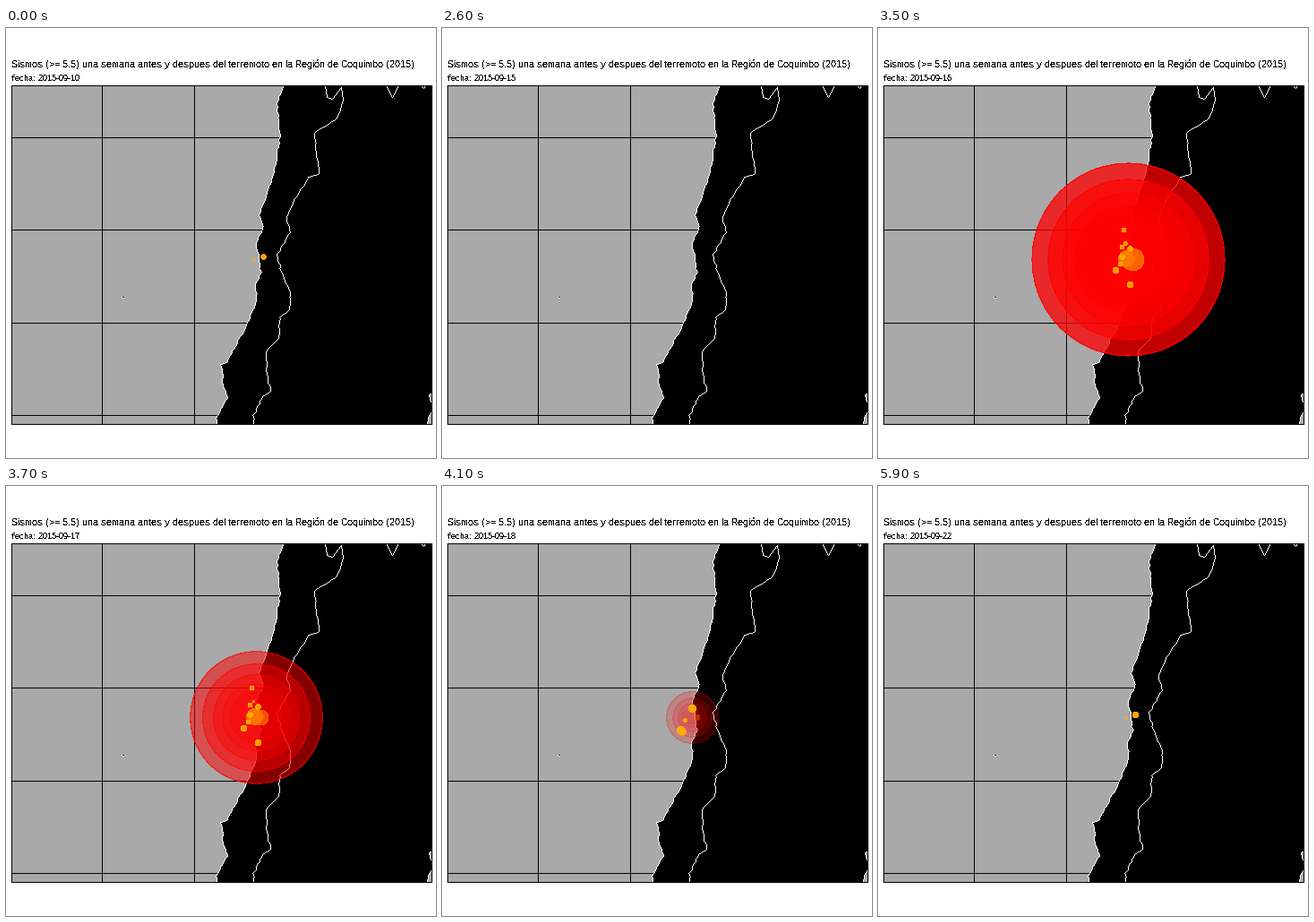
Animation of 480x480 px, one loop 6 s. Source, as a matplotlib script:

```python
import matplotlib.pyplot as plt
import numpy as np
from matplotlib.animation import FuncAnimation
from matplotlib.collections import PolyCollection
from matplotlib.patches import Circle, Polygon, Rectangle

SIZE, DPI = 480, 72
FRAMES, INTERVAL = 60, 100
WAKE = 18
SEA = "#a9a9a9"
LEFT, TOP, RIGHT, BOTTOM = 6, 64, 475, 442
GRID_STEP = 103.3

plt.rcParams.update({
    "font.family": "Liberation Sans",
    "text.hinting": "native",
    "text.hinting_factor": 1,
})
rng = np.random.default_rng(4)

# main bends from north to south
COAST = [
    (309, 64), (302, 84), (305, 120), (299, 160), (291, 184), (282, 208),
    (287, 221), (279, 240), (284, 272), (278, 287), (279, 303), (270, 328),
    (246, 373), (239, 375), (242, 386), (241, 395), (247, 413), (235, 434),
    (235, 442),
]
BORDER = [
    (376, 80), (369, 101), (344, 116), (347, 148), (349, 163), (338, 166),
    (322, 190), (313, 210), (316, 228), (302, 254), (310, 282), (317, 294),
    (316, 314), (305, 323), (304, 345), (290, 361), (290, 385), (296, 405),
    (286, 410), (276, 432), (276, 442),
]
NORTH = [
    [(356, 64), (358, 77), (364, 79), (374, 66), (376, 80)],
    [(424, 64), (431, 77), (438, 64)],
    [(463, 64), (466, 67), (468, 64)],
]
BAYS = [
    [(475, 407), (472, 409), (473, 415), (475, 418)],
    [(475, 428), (471, 434), (470, 442)],
]

# (first frame, last frame, leaves a wake, dots as x, y, radius)
QUAKES = [
    (30, 34, True, [(279, 258, 128), (284, 258, 15), (271, 262, 3.5),
                    (277, 250, 3), (276, 240, 2.8)]),
    (35, 39, False, [(277, 257, 9), (281, 286, 3.7), (265, 270, 3.7),
                     (272, 255, 3), (281, 246, 3), (274, 225, 2.8),
                     (272, 244, 2.8), (270, 263, 2.8)]),
    (40, 44, True, [(266, 272, 4.5), (268, 274, 4), (279, 248, 4.5),
                    (271, 261, 2.2)]),
    (55, 58, True, [(287, 255, 4.5), (277, 258, 1.6)]),
]

fig = plt.figure(figsize=(SIZE / DPI, SIZE / DPI), dpi=DPI, facecolor="white")
ax = fig.add_axes([0, 0, 1, 1])
ax.set_xlim(0, SIZE)
ax.set_ylim(SIZE, 0)
ax.axis("off")


def ink(points, color, z):
    """Draw a crisp one-pixel polyline."""
    cells = set()
    for (x0, y0), (x1, y1) in zip(points, points[1:]):
        n = int(max(abs(x1 - x0), abs(y1 - y0), 1)) + 1
        xs = np.floor(np.linspace(x0, x1, n) + 0.5)
        ys = np.floor(np.linspace(y0, y1, n) + 0.5)
        cells.update(zip(xs, ys))
    squares = [[(x, y), (x + 1, y), (x + 1, y + 1), (x, y + 1)]
               for x, y in cells]
    ax.add_collection(PolyCollection(squares, facecolors=color,
                                     edgecolors="none", linewidths=0,
                                     zorder=z), autolim=False)


def area(points, color, z):
    ax.add_patch(Polygon([(x + 0.5, y + 0.5) for x, y in points],
                         fc=color, lw=0, zorder=z))


def rugged(bends):
    """One point per row between the bends, with a small random wiggle."""
    xs, ys = zip(*bends)
    rows = np.arange(ys[0], ys[-1] + 1)
    knots = rows[::4]
    wiggle = np.interp(rows, knots, rng.uniform(-1, 1, len(knots)))
    return list(zip(np.round(np.interp(rows, ys, xs) + wiggle), rows))


def label(x, y, text, size):
    return ax.text(x, y, text, fontsize=size, va="baseline", ha="left",
                   color="black", antialiased=False)


def draw_map():
    ax.add_patch(Rectangle((LEFT, TOP), RIGHT - LEFT + 1, BOTTOM - TOP + 1,
                           fc=SEA, lw=0, zorder=0))
    for k in range(2):
        x = 107 + round(GRID_STEP * k)
        ink([(x, TOP), (x, BOTTOM)], "black", 1)
    for k in range(4):
        y = 122 + round(GRID_STEP * k)
        ink([(LEFT, y), (RIGHT, y)], "black", 1)

    coast = rugged(COAST)
    area(coast + [(RIGHT, BOTTOM), (RIGHT, TOP)], "black", 2)
    for bay in BAYS:
        area(bay + [(RIGHT, bay[-1][1])], SEA, 2.5)
    for path in [coast, rugged(BORDER)] + NORTH + BAYS:
        ink(path, "white", 3)
    ink([(129, 300), (131, 301)], "white", 3)
    ink([(130, 300), (131, 300)], "black", 4)
    ink([(LEFT, TOP), (RIGHT, TOP), (RIGHT, BOTTOM), (LEFT, BOTTOM),
         (LEFT, TOP)], "black", 9)


def color_for(radius):
    if radius > 50:
        return 1, 0, 0
    return (1, 0.48, 0) if radius > 7 else (1, 0.67, 0)


def add_quakes(points, fade):
    for x, y, radius in points:
        rgba = (*color_for(radius), 0.9 * fade)
        # aliased fills grow by about half a pixel
        dot = Circle((x + 0.5, y + 0.5), max(0.3, radius * fade - 0.4),
                     fc=rgba, ec=rgba, lw=0.2, zorder=5, antialiased=False)
        dots.append(ax.add_patch(dot))


def day_at(i):
    return 22 if i == FRAMES - 1 else 10 + max(0, i - 1) // 5


def draw(i):
    while dots:
        dots.pop().remove()
    for age in range(WAKE - 1, -1, -1):
        then = (i - age) % FRAMES
        fade = (1 - age / WAKE) ** 3
        for first, last, wake, points in QUAKES:
            if first <= then <= last and (wake or age == 0):
                add_quakes(points, fade)
    date.set_text(f"fecha: 2015-09-{day_at(i):02d}")
    return dots + [date]


draw_map()
label(6, 44, "Sismos (>= 5.5) una semana antes y despues del terremoto "
             "en la Región de Coquimbo (2015)", 11)
date = label(6, 59, "", 9)
dots = []

anim = FuncAnimation(fig, draw, frames=FRAMES, interval=INTERVAL,
                     repeat=True, repeat_delay=0, blit=False)
plt.show()
```
